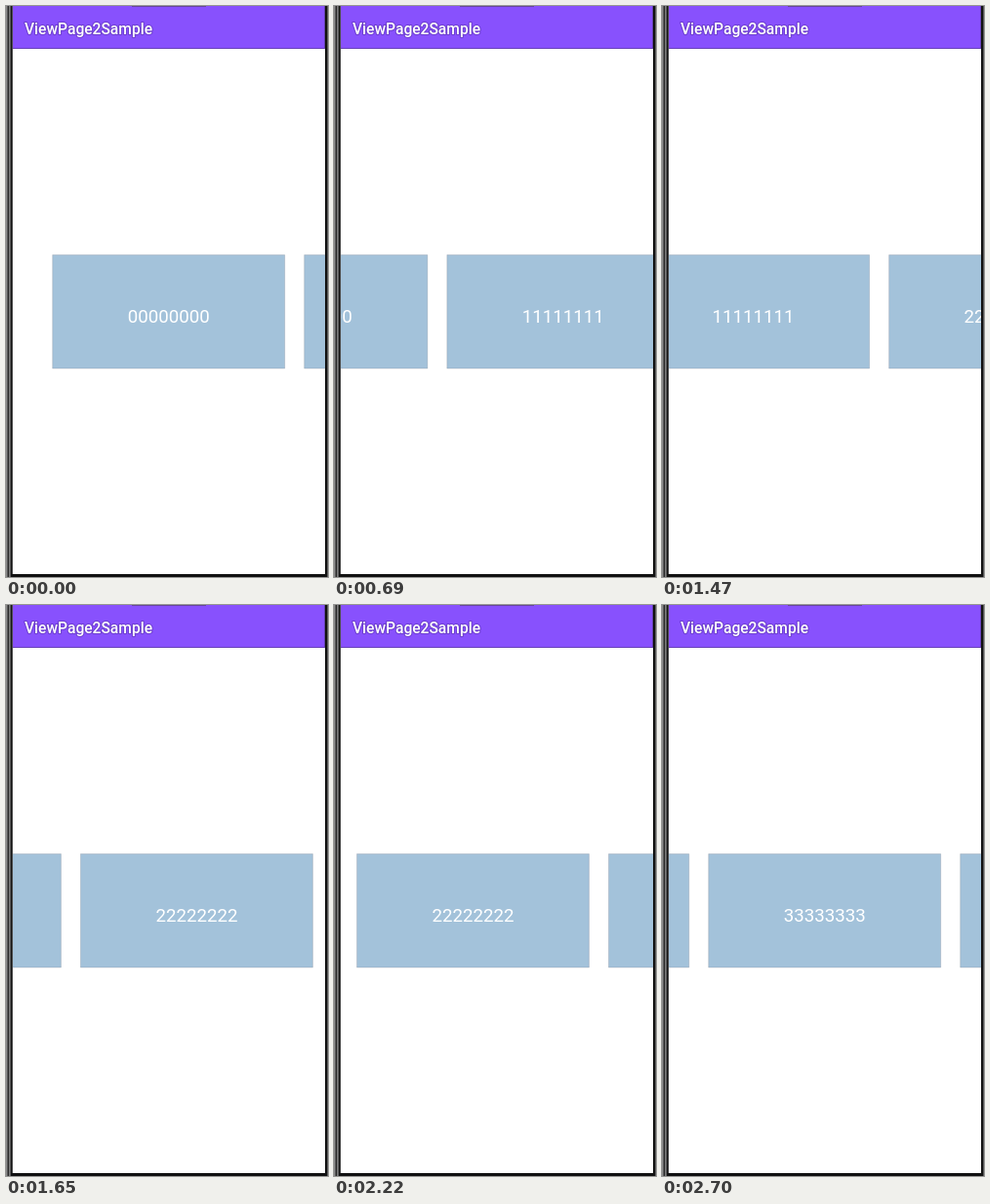
An HTML page with a canvas for the animation above (2760 ms loop, 330 px wide and 586 px high).

```html
<!DOCTYPE html>
<html lang="en">
<head>
<meta charset="utf-8">
<title>Pager</title>
<style>
  html, body { margin: 0; width: 100%; height: 100%; overflow: hidden; background: #fff; }
  canvas { display: block; }
</style>
</head>
<body>
<canvas id="stage" width="330" height="586"></canvas>
<script>
const ctx = document.getElementById('stage').getContext('2d');
const LOOP = 2760;
const STEP = 30;
const PAGE = { x: 47.7, y: 255.4, w: 238, h: 116.6, pitch: 258, count: 5 };
const SCREEN = { x: 7, y: 44, right: 327, bottom: 583 };
const LEFT_BEZEL = ['#8c8c8c', '#5a5a5a', '#2a2a2a', '#7c7c7c', '#5c5c5c', '#161616', '#4c4c4c'];

// Each swipe: a finger drag covering `share` of a page, then a decelerating snap.
const SWIPES = [
  { start: 390, drag: 210, share: 0.356, end: 900 },
  { start: 1260, drag: 240, share: 0.370, end: 1800 },
  { start: 2100, drag: 240, share: 0.376, end: 2640 }
];

function swipeProgress({ start, drag, share, end }, time) {
  const t = time - start;
  if (t <= 0) return 0;
  if (time >= end) return 1;
  if (t < drag) return share * (t / drag) ** 2;
  const left = (end - time) / (end - start - drag);
  return 1 - (1 - share) * left ** 2.5;
}

function rect(color, x, y, w, h) {
  ctx.fillStyle = color;
  ctx.fillRect(x, y, w, h);
}

function label(text, x, y, font, align, halo) {
  ctx.font = `${font} Roboto, sans-serif`;
  ctx.textAlign = align;
  if (halo) {
    ctx.strokeStyle = halo;
    ctx.lineWidth = 2;
    ctx.lineJoin = 'round';
    ctx.strokeText(text, x, y);
  }
  ctx.fillStyle = '#fff';
  ctx.fillText(text, x, y);
}

function drawPages(position) {
  ctx.save();
  ctx.beginPath();
  ctx.rect(SCREEN.x, SCREEN.y, SCREEN.right - SCREEN.x, SCREEN.bottom - SCREEN.y);
  ctx.clip();
  for (let i = 0; i < PAGE.count; i++) {
    const x = PAGE.x + (i - position) * PAGE.pitch;
    rect('#a3c2da', x, PAGE.y, PAGE.w, PAGE.h);
    ctx.strokeStyle = 'rgba(120, 125, 135, 0.25)';
    ctx.lineWidth = 1;
    ctx.strokeRect(x, PAGE.y, PAGE.w, PAGE.h);
    label(String(i).repeat(8), x + PAGE.w / 2, 324.6, '18.7px', 'center');
  }
  ctx.restore();
}

function drawHeader() {
  const width = SCREEN.right - SCREEN.x;
  rect('#8851fd', SCREEN.x, 0, width, SCREEN.y);
  rect('#6743b8', SCREEN.x, SCREEN.y - 1, width, 1);
  rect('#6743b8', SCREEN.right - 1, 0, 1, SCREEN.y);
  rect('#67459f', 129, 0, 76, 1);
  label('ViewPage2Sample', 19, 28.6, '500 15.6px', 'left', 'rgba(70, 35, 140, 0.4)');
}

function drawBezel() {
  LEFT_BEZEL.forEach((color, x) => rect(color, x, 0, 1, 586));
  rect('#111', SCREEN.right, 0, 2, 586);
  rect('#555', 329, 0, 1, 586);
  rect('#111', 5, SCREEN.bottom, 324, 3);
}

function draw(time) {
  const position = SWIPES.reduce((sum, s) => sum + swipeProgress(s, time), 0);
  rect('#fff', 0, 0, 330, 586);
  drawPages(position);
  drawHeader();
  drawBezel();
}

const begin = performance.now();
function tick() {
  const time = (performance.now() - begin) % LOOP;
  draw(Math.floor(time / STEP) * STEP);
  requestAnimationFrame(tick);
}
tick();
</script>
</body>
</html>
```
